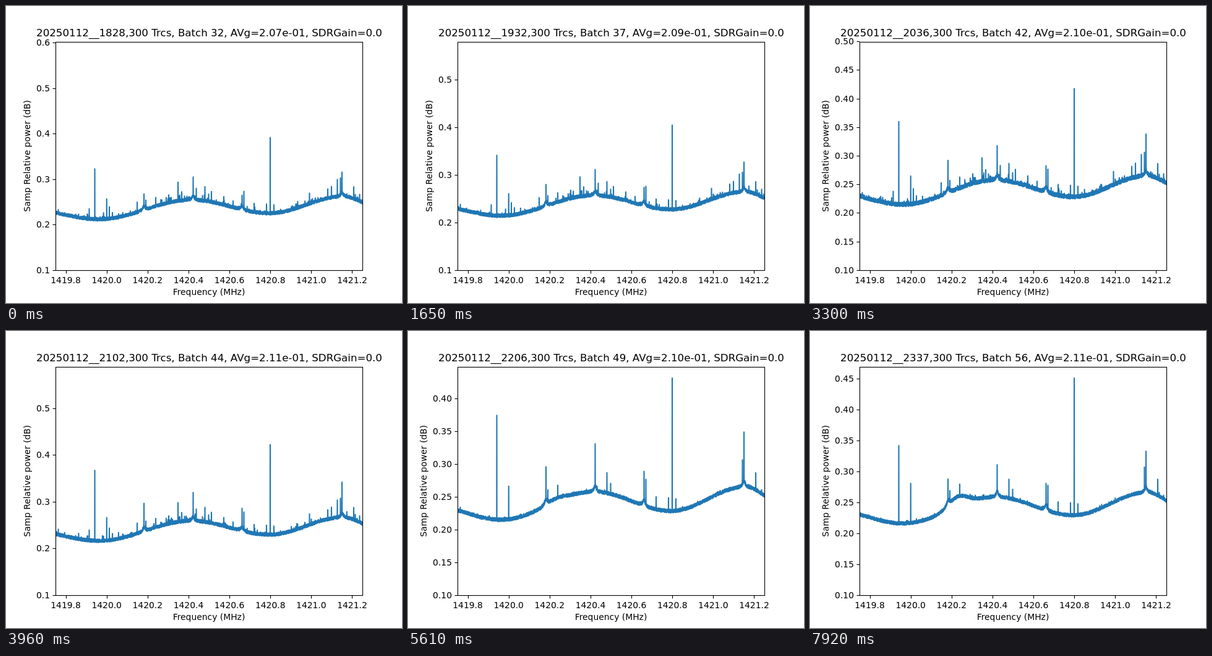
Animation of 640x480 px, one loop 8000 ms. Source, as an HTML page with a canvas:

```html
<!DOCTYPE html>
<html lang="en">
<head>
<meta charset="utf-8">
<title>Spectrum batches</title>
<style>
  html, body { margin: 0; width: 100%; height: 100%; overflow: hidden; background: #fff; }
  canvas { display: block; }
</style>
</head>
<body>
<canvas id="plot" width="640" height="480"></canvas>
<script>
const ctx = document.getElementById('plot').getContext('2d');
const LOOP = 8000, STEP = 330, PER_PIXEL = 8;
const LEFT = 80, RIGHT = 576, TOP = 57.6, BOTTOM = 427.2, FLOOR = 0.1;

// Axis limits while interference outside the view drives the autoscale
const noisyLimits = [.603, .57, .56, .582, .52, .58, .52, .657, .659, .6, .5, .615, .59, .5, .571];
const isQuiet = step => step >= noisyLimits.length;

const averages = [[0, .207], [3, .209], [10, .210], [14, .213], [20, .207], [24, .211]];

// Tall carriers: x position and their tops at four steps
const carrierSteps = [0, 14, 20, 24];
const carriers = [
  [143.5, .323, .375, .374, .342],
  [162.7, .257, .268, .265, .281],
  [223,   .268, .302, .290, .288],
  [302.5, .305, .323, .339, .311],
  [381.5, .265, .290, .288, .281],
  [427,   .392, .428, .4345, .4515],
  [543,   .316, .347, .351, .333]
];
const skirted = [223, 302.5, 381.5, 543];

// Small spurs: x position, height above the background
const lastingSpurs = [[226, .017], [242, .019], [321.5, .031], [327.5, .016], [384.5, .038],
  [401, .019], [421, .02], [433, .018], [540.5, .037], [562, .026]];
const passingSpurs = [[134.5, .022], [167, .026], [212, .022], [263, .017], [278, .041],
  [284, .019], [307.5, .024], [332, .023], [352, .018], [367, .014], [490.5, .023],
  [520, .02], [526, .024], [535.5, .037]];

// Turning points of the background wave
const wave = [[40, .2327], [150, .2123], [300, .255], [425, .2256], [545, .2625], [600, .2405]];

const linear = k => k;
const smooth = k => (1 - Math.cos(Math.PI * k)) / 2;

function interpolate(points, x, ease = linear) {
  let i = 1;
  while (i < points.length - 1 && points[i][0] < x) i++;
  const [x0, y0] = points[i - 1], [x1, y1] = points[i];
  return y0 + (y1 - y0) * ease((x - x0) / (x1 - x0));
}

const averageAt = step => interpolate(averages, step);

function carrierTop([, ...tops], step) {
  return interpolate(carrierSteps.map((s, i) => [s, tops[i]]), step);
}

function limitAt(step) {
  if (!isQuiet(step)) return noisyLimits[step];
  const peak = Math.max(...carriers.map(c => carrierTop(c, step)));
  return peak + .05 * (peak - .083);
}

function background(x, step) {
  const hump = Math.max(0, step - 14) * .0016 * Math.exp(-(((x - 239) / 21) ** 2));
  const skirts = skirted.reduce((sum, cx) => sum + .011 * Math.exp(-Math.abs(x - cx) / 2.5), 0);
  return interpolate(wave, x, smooth) + averageAt(step) - .207 + hump + skirts;
}

function seeded(seed) {
  let s = (seed * 2654435761) >>> 0;
  return () => {
    s = (s + 0x6D2B79F5) >>> 0;
    let t = Math.imul(s ^ (s >>> 15), 1 | s);
    t = (t + Math.imul(t ^ (t >>> 7), 61 | t)) ^ t;
    return ((t ^ (t >>> 14)) >>> 0) / 4294967296;
  };
}

function spectrum(step) {
  const quiet = isQuiet(step);
  const noise = seeded(step + 11), comb = seeded(5);
  const spread = quiet ? .0028 : .0037;
  const levels = [];
  for (let i = 0; i <= (RIGHT - LEFT) * PER_PIXEL; i++) {
    const hit = comb() < .05, height = -Math.log(1 - comb() * .98) * .0037;
    levels.push(background(LEFT + i / PER_PIXEL, step) + spread * (2 * noise() - 1)
      + (hit ? height * (quiet ? .3 : 1) : 0));
  }
  const setPeak = (x, level) => levels[Math.round((x - LEFT) * PER_PIXEL)] = level;
  const spurs = quiet ? lastingSpurs : [...lastingSpurs, ...passingSpurs];
  for (const [x, height] of spurs) setPeak(x, background(x, step) + height);
  for (const carrier of carriers) setPeak(carrier[0], carrierTop(carrier, step));
  return levels;
}

function line(x0, y0, x1, y1) {
  ctx.beginPath();
  ctx.moveTo(x0, y0);
  ctx.lineTo(x1, y1);
  ctx.stroke();
}

function text(string, x, y, align = 'center', size = 13.889) {
  ctx.font = `${size}px "DejaVu Sans", sans-serif`;
  ctx.textAlign = align;
  ctx.fillText(string, x, y);
}

const snap = v => Math.round(v) + .5;

function titleFor(step) {
  const minutes = 18 * 60 + 28 + Math.floor(12.8 * step + .0032 * step * step);
  const clock = Math.floor(minutes / 60) + String(minutes % 60).padStart(2, '0');
  const average = (averageAt(step) * 10).toFixed(2);
  return `20250112__${clock},300 Trcs, Batch ${32 + step}, AVg=${average}e-01, SDRGain=0.0`;
}

function drawTrace(step, toY) {
  ctx.save();
  ctx.beginPath();
  ctx.rect(LEFT, TOP, RIGHT - LEFT, BOTTOM - TOP);
  ctx.clip();
  ctx.strokeStyle = '#1f77b4';
  ctx.lineWidth = 2.083;
  ctx.lineJoin = 'round';
  ctx.beginPath();
  spectrum(step).forEach((v, i) => ctx.lineTo(LEFT + i / PER_PIXEL, toY(v)));
  ctx.stroke();
  ctx.restore();
}

function draw(step) {
  const limit = limitAt(step);
  const toY = v => BOTTOM - (v - FLOOR) / (limit - FLOOR) * (BOTTOM - TOP);
  ctx.fillStyle = '#fff';
  ctx.fillRect(0, 0, 640, 480);
  drawTrace(step, toY);

  ctx.strokeStyle = ctx.fillStyle = '#000';
  ctx.lineWidth = 1.111;
  ctx.strokeRect(snap(LEFT), snap(TOP), RIGHT - LEFT, snap(BOTTOM) - snap(TOP));

  for (let i = 0; i < 8; i++) {
    const f = 1419.8 + i * .2, x = LEFT + (f - 1419.75) / 1.5 * (RIGHT - LEFT);
    line(snap(x), 427.5, snap(x), 432.5);
    text(f.toFixed(1), x, 448);
  }

  const fine = limit <= .55, gap = fine ? .05 : .1;
  for (let v = FLOOR; v <= limit + 1e-9; v += gap) {
    const y = Math.floor(toY(v) + 1e-6);
    line(75.5, y + .5, 80.5, y + .5);
    text(v.toFixed(fine ? 2 : 1), 71, y + 5, 'right');
  }

  text('Frequency (MHz)', 328, 467);
  ctx.save();
  ctx.translate(fine ? 30 : 39, 242.4);
  ctx.rotate(-Math.PI / 2);
  text('Samp Relative power (dB)', 0, 0);
  ctx.restore();
  text(titleFor(step), 328.5, 49, 'center', 16.667);
}

let shown = -1;
function tick() {
  const step = Math.floor(performance.now() % LOOP / STEP);
  if (step !== shown) draw(shown = step);
  requestAnimationFrame(tick);
}
tick();
</script>
</body>
</html>
```
